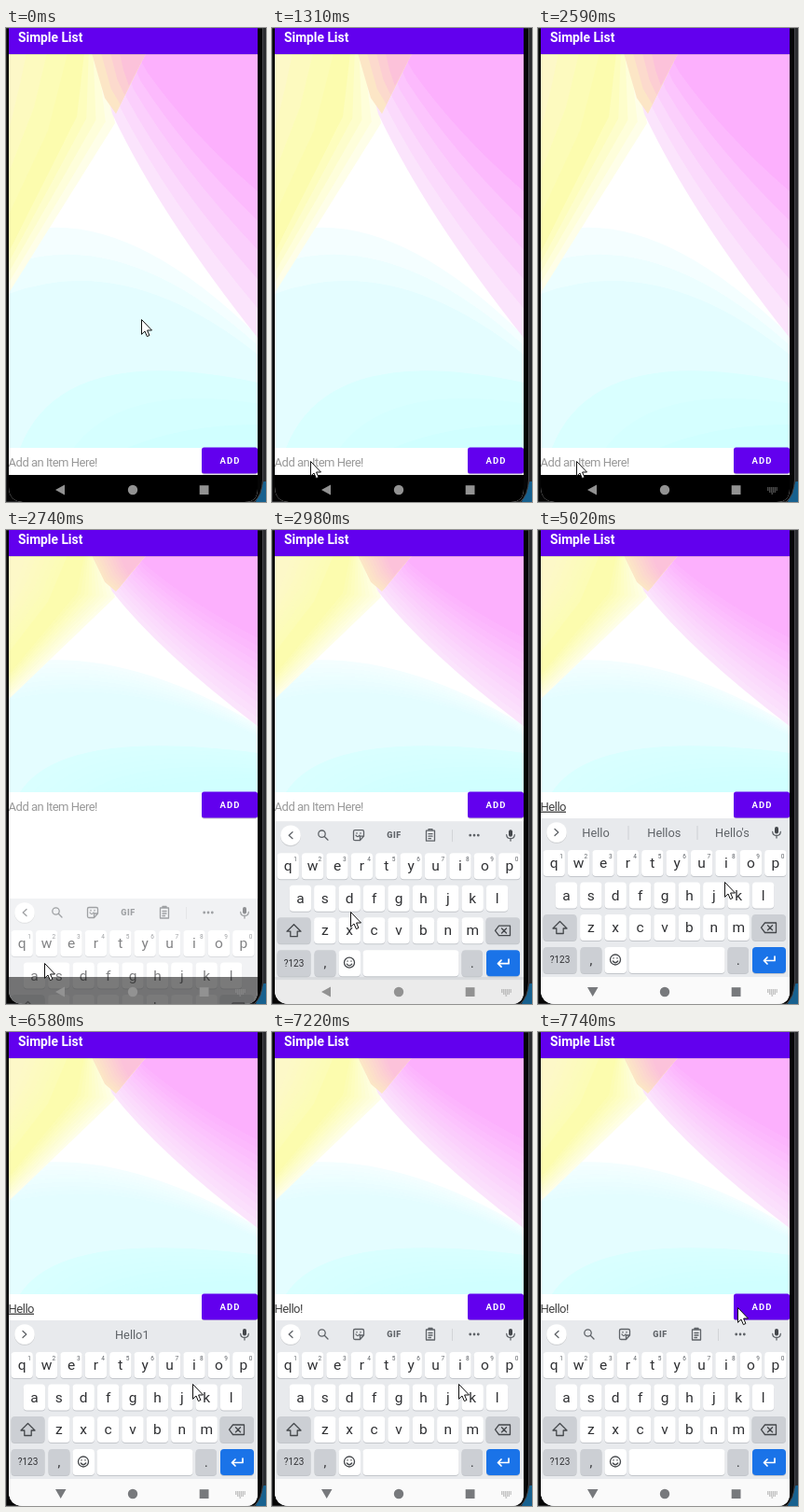
Recreate the animation shown at these times as an HTML page. Size 279x508 px, loop 8000 ms.

```html
<!DOCTYPE html>
<html lang="en">
<head>
<meta charset="utf-8">
<title>Simple List</title>
<style>
  html, body { margin: 0; width: 100%; height: 100%; overflow: hidden; background: #050505; }
  svg { display: block; }
  #stage { width: 100vw; height: 100vh; }
  text { font-family: Roboto, sans-serif; white-space: pre; }
  .title { font-size: 13.8px; font-weight: 700; fill: #fff; }
  .add { font-size: 9.5px; font-weight: 700; letter-spacing: 1.1px; fill: #fff; }
  #entry { font-size: 13px; letter-spacing: -.5px; }
  .u { text-decoration: underline #777; }
  .mid { text-anchor: middle; }
  .key { font-size: 15.5px; fill: #303134; }
  .digit { font-size: 6.5px; fill: #5f6368; }
  .word { font-size: 12.8px; fill: #5f6368; }
  .line { fill: none; stroke: #5f6368; stroke-width: 1.3; stroke-linecap: round; stroke-linejoin: round; }
</style>
</head>
<body>
<svg id="stage" viewBox="0 0 279 508">
  <defs>
    <clipPath id="screen"><path d="M3 0H270V494Q270 508 256 508H18Q3 507 3 492Z"/></clipPath>
  </defs>
  <rect width="279" height="508" fill="#2b2c2f"/>
  <path d="M276.5 486H279V508H268Z" fill="#17618f"/>
  <path d="M0 0H275.5V484Q275 501 266 508H0Z" fill="#050505" stroke="#45464a"/>

  <g clip-path="url(#screen)">
    <rect x="3" width="267" height="508" fill="#fff"/>
    <svg id="tall" x="3" y="27" width="267" height="423" viewBox="3 27 267 423" preserveAspectRatio="none"></svg>
    <svg id="short" x="3" y="27" width="267" height="254" viewBox="3 27 267 423" preserveAspectRatio="none"></svg>
    <rect x="3" y="28" width="267" height="1" fill="#000" opacity=".1"/>
    <rect x="3" width="267" height="28" fill="#6200ee"/>
    <text class="title" x="13" y="14.5">Simple List</text>

    <g id="row">
      <rect x="3" y="281" width="267" height="29" fill="#fff"/>
      <text id="entry" x="2.6" y="300.6"></text>
      <rect x="210" y="282" width="60" height="27.5" rx="2.5" fill="#000" opacity=".2"/>
      <rect x="210" y="280.5" width="60" height="28" rx="2.5" fill="#6200ee"/>
      <text class="add" x="229.4" y="298.3">ADD</text>
    </g>

    <g id="keyboard">
      <rect x="3" y="309" width="267" height="200" fill="#e8eaed"/>
      <circle cx="20" cy="325" r="11" fill="#000" opacity=".1"/>
      <circle cx="20" cy="324" r="10.8" fill="#fff"/>
      <path id="chevron" class="line" d="M22 320.5L18.2 324L22 327.5"/>
      <g id="tools">
        <g class="line">
          <circle cx="53.5" cy="322.5" r="3.7"/><path d="M56.3 325.3L60 329"/>
          <path d="M89 318.5H97Q98.5 318.5 98.5 320V325L94.5 329.5H89Q87.5 329.5 87.5 328V320Q87.5 318.5 89 318.5ZM94.5 329.5V325H98.5M90 324Q92 327 94 324M91 321.5V322M95 321.5V322"/>
          <path d="M165.5 319H174.5V330H165.5ZM168 319V317.5H172V319M168 322.5H172M168 325H172M168 327.5H170.5"/>
        </g>
        <text class="mid" x="131" y="327.3" font-size="9" font-weight="800" letter-spacing=".5" fill="#5f6368">GIF</text>
        <path d="M193.5 318V331" stroke="#d2d4d8"/>
        <path d="M212.7 324H222" stroke="#5f6368" stroke-width="2.8" stroke-linecap="round" stroke-dasharray="0 4.3"/>
      </g>
      <g id="words">
        <path id="dividers" d="M97 317V332M171 317V332" stroke="#cdd0d4"/>
        <text class="word mid" x="62" y="328.6"></text>
        <text class="word mid" x="135.3" y="328.6"></text>
        <text class="word mid" x="208.5" y="328.6"></text>
      </g>
      <rect x="254" y="318" width="4" height="7.5" rx="2" fill="#44474b"/>
      <path class="line" d="M251.7 323.5Q252 327.5 256 327.5T260.3 323.5M256 327.5V330"/>
      <g id="keys"></g>
      <g class="line" style="stroke:#44474b">
        <path d="M23.5 419.5L31 427H27.2V432.5H19.8V427H16Z"/>
        <path d="M243.5 421H255.5V431.5H243.5L239.5 426.2ZM246.5 423.8L251.5 428.8M251.5 423.8L246.5 428.8"/>
        <circle cx="83" cy="460.5" r="5.5"/>
        <path d="M80.3 462Q83 465.5 85.7 462M81 458.7V459M85 458.7V459"/>
        <path d="M254 457V461.5H242.5M246 458L242.5 461.5L246 465" stroke="#fff" stroke-width="1.7"/>
      </g>
      <rect x="3" y="479" width="267" height="30" fill="#fafafa"/>
    </g>

    <rect id="shade" x="3" y="479" width="267" height="29"/>
    <g id="nav">
      <path id="back"/>
      <circle cx="136" cy="495" r="5.2"/>
      <rect x="207.7" y="490.2" width="9.8" height="9.8"/>
      <path id="switcher" d="M246 493H257M246 495H257M248 497H255M250.5 499H252.5" fill="none" stroke="#929292" stroke-width="1.2" stroke-dasharray="1.4 .5"/>
    </g>
  </g>

  <path id="cursor" d="M.5 .5V16.3L4 13L6.4 18.6L8.9 17.5L6.6 12H11.5Z" fill="#fff" stroke="#111" stroke-linejoin="round"/>
</svg>

<script>
const LOOP = 8000, TICK = 129;
const OPEN_TICK = 21, OPEN_TICKS = 3;
const RECOGNISE_LAG = 240;
const $ = id => document.getElementById(id);
const mix = (a, b, k) => a + (b - a) * k;
const clamp = k => Math.min(1, Math.max(0, k));
const easeOut = (k, power) => 1 - (1 - k) ** power;
const show = (el, on) => el.setAttribute('visibility', on ? 'visible' : 'hidden');

// Bands between two edges; an edge is a polyline whose last part may be a quadratic curve.
function fan(from, to, outer, inner, steps, corners, segment = 'L') {
  return Array.from({ length: steps }, (_, i) => {
    const k = i / (steps - 1);
    const edge = from.map((v, j) => mix(v, to[j], k));
    const d = `M${edge.slice(0, -4)}${segment}${edge.slice(-4)}L${corners}Z`;
    return `<path d="${d}" style="fill:color-mix(in srgb, ${inner} ${k * 100}%, ${outer})"/>`;
  }).join('');
}

function wallpaper(n) {
  const floor = '270 450 3 450';
  return fan([3, 222, 120, 183, 270, 330], [3, 285, 130, 238, 270, 350], '#f4feff', '#e4fdff', n, floor, 'Q')
    + fan([15, 450, 60, 335, 270, 380], [130, 450, 190, 425, 270, 425], '#d9ffff', '#d0ffff', n, floor, 'Q')
    + fan([103, 27, 117, 102, 3, 284], [84, 27, 76, 95, 3, 240], '#fefee8', '#fcfcae', n + 2, '3 27')
    + fan([66, 27, 45, 110, 3, 200], [22, 27, 15, 60, 3, 110], '#fcfcb6', '#fdf8c8', n, '3 27')
    + fan([98, 27, 114, 92, 165, 200, 270, 332], [140, 27, 152, 48, 200, 115, 270, 175], '#fbe4fc', '#fcb0fd', n + 3, '270 27', 'Q')
    + fan([92, 27, 106, 75, 118, 92], [122, 27, 126, 45, 132, 62], '#fce6c6', '#fcc2da', n + 1, '150 27');
}
$('tall').innerHTML = wallpaper(3);
$('short').innerHTML = wallpaper(9);

function key(x, y, w, label = '', fill = '#fff', size = 15.5) {
  return `<rect x="${x}" y="${y + 1}" width="${w}" height="28" rx="4" fill="#c3c6cb"/>`
    + `<rect x="${x}" y="${y}" width="${w}" height="28" rx="4" fill="${fill}"/>`
    + `<text class="key mid" x="${x + w / 2}" y="${y + 14 + size * .34}" style="font-size:${size}px">${label}</text>`;
}

function keyboard() {
  const grey = '#cccfd4', pitch = 26.4, center = 136;
  let out = '';
  ['qwertyuiop', 'asdfghjkl', 'zxcvbnm'].forEach((letters, row) => {
    const left = center - letters.length * pitch / 2 + 1.5;
    [...letters].forEach((c, i) => out += key(left + i * pitch, 343 + row * 34.5, 23.4, c));
  });
  for (let i = 0; i < 10; i++)
    out += `<text class="digit mid" x="${25 + i * pitch}" y="351.5">${(i + 1) % 10}</text>`;
  return out
    + key(5.5, 412, 36, '', grey) + key(229.5, 412, 36.5, '', grey)
    + key(5.5, 447, 36, '?123', grey, 10) + key(45.5, 447, 23, ',', grey, 14)
    + key(71.5, 447, 23.5) + key(97.5, 447, 103) + key(203.5, 447, 22.5, '.', grey, 14)
    + key(230, 447, 36, '', '#1a73e8');
}
$('keys').innerHTML = keyboard();

// Pointer moves, timed in ticks.
const moves = [
  { from: 0, to: 4, x: 49, y: 464 },
  { from: 4, to: 6, x: 41, y: 464 },
  { from: 22, to: 27, x: 200, y: 377, easeX: 1.4, easeY: 4.5 },
  { from: 58, to: 60, x: 214, y: 295 }
];
function pointer(tick) {
  let x = 145, y = 312;
  for (const m of moves) {
    const k = clamp((tick - m.from) / (m.to - m.from));
    x = mix(x, m.x, easeOut(k, m.easeX || 1));
    y = mix(y, m.y, easeOut(k, m.easeY || 1));
  }
  return [x, y];
}

// Key presses; '<' deletes.
const presses = { 3990: 'H', 4270: 'e', 4530: 'l', 4650: 'l', 4770: 'o', 5550: '1', 6580: '<', 6980: '!' };
const textAt = t => Object.entries(presses)
  .filter(([time]) => time <= t)
  .reduce((text, [, c]) => c === '<' ? text.slice(0, -1) : text + c, '');

function suggest(text) {
  if (text.length < 2 || text.endsWith('!')) return null;
  return text.endsWith('1') ? ['', text, ''] : [text, text + 's', text + "'s"];
}

const wordTexts = $('words').querySelectorAll('text');

function draw(t) {
  const tick = Math.floor(t / TICK + .06);
  const open = tick >= OPEN_TICK;
  const slide = clamp((tick - OPEN_TICK) / OPEN_TICKS), settled = slide === 1;
  show($('tall'), !open);
  show($('short'), open);
  $('row').setAttribute('transform', `translate(0 ${open ? 0 : 169})`);

  $('keyboard').setAttribute('transform', `translate(0 ${open ? 86 * (1 - slide) ** 3 : 200})`);
  $('keyboard').setAttribute('opacity', clamp(.6 + slide));
  $('shade').setAttribute('opacity', open ? .52 * (1 - slide) ** 2 : 1);
  $('nav').setAttribute('fill', settled ? '#77797c' : '#929292');
  $('back').setAttribute('d', settled ? 'M53 490H64.5L58.7 500Z' : 'M53 495L63 489.5V500.5Z');
  show($('switcher'), tick >= OPEN_TICK - 1);

  const typed = textAt(t), recognised = textAt(t - RECOGNISE_LAG);
  const words = suggest(recognised);
  const marked = words ? recognised.length : 0;
  $('entry').setAttribute('fill', typed ? '#404040' : '#999');
  $('entry').innerHTML = typed
    ? `<tspan class="u">${typed.slice(0, marked)}</tspan><tspan>${typed.slice(marked)}</tspan>`
    : 'Add an Item Here!';

  show($('tools'), !words);
  show($('words'), words);
  show($('dividers'), words && words[0]);
  $('chevron').setAttribute('d', words ? 'M18 320.5L21.8 324L18 327.5' : 'M22 320.5L18.2 324L22 327.5');
  if (words) wordTexts.forEach((el, i) => el.textContent = words[i]);

  show($('cursor'), tick < 57 || tick >= 59);
  $('cursor').setAttribute('transform', `translate(${pointer(tick).map(Math.round)})`);
}

const start = performance.now();
function frame() {
  draw((performance.now() - start) % LOOP);
  requestAnimationFrame(frame);
}
frame();
</script>
</body>
</html>
```
